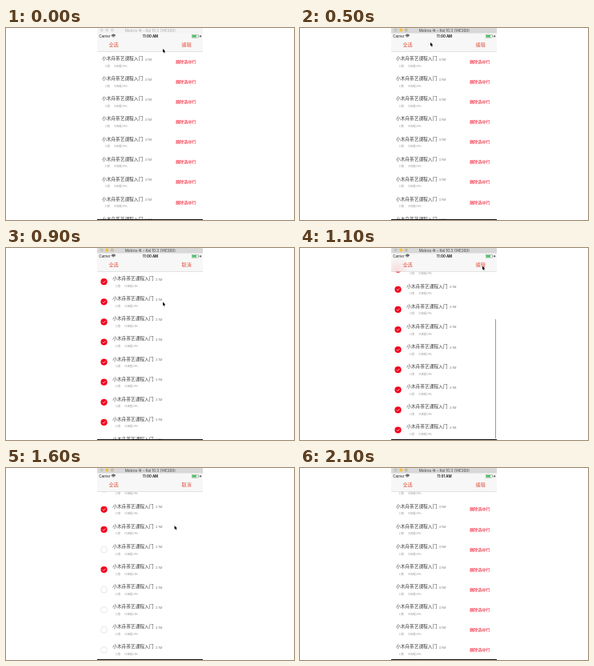
An HTML page with a canvas that plays this animation: 360x240 px, repeating every 2.4 s.

```html
<!DOCTYPE html>
<html lang="zh">
<head>
<meta charset="utf-8">
<style>
  html, body { margin: 0; width: 360px; height: 240px; overflow: hidden; background: #fff; }
  canvas { display: block; }
</style>
</head>
<body>
<canvas id="stage" width="360" height="240"></canvas>
<script>
const ctx = document.getElementById('stage').getContext('2d');
const CJK = '"Noto Sans CJK SC", "Noto Sans CJK", sans-serif';
const LATIN = 'Inter, "Liberation Sans", sans-serif';
const LOOP = 2400, STEP = 100, LAST = 21;
const ROWS = 12, PITCH = 25.1, SCROLL = 90.8;
const RED = '#f0001c', LINK = '#e4503c';

// pointer: [step, x, y], held until the next entry
const pointer = [
  [0, 196, 26], [1, 223, 23], [2, 134.5, 23.5], [4, 223, 22], [5, 163, 18],
  [6, 222, 21], [8, 134, 22], [9, 196, 67.5], [10, 205, 52], [11, 228, 22.5],
  [14, 185, 49], [15, 201, 123], [16, 210.6, 72], [17, 216, 50], [18, 226, 22]
];
// list: [step, editing, selected rows]
const all = [...Array(ROWS).keys()];
const list = [
  [0, false, []], [1, true, []], [3, true, all], [5, false, []],
  [7, true, []], [8, true, all], [12, false, []], [13, true, []],
  [14, true, [4]], [15, true, [4, 7]], [16, true, [4, 5, 7]], [19, false, []]
];
const at = (track, step) => track.filter(k => k[0] <= step).pop();

function rect(x, y, w, h, color) {
  ctx.fillStyle = color;
  ctx.fillRect(x, y, w, h);
}

function disc(x, y, r, color) {
  ctx.beginPath();
  ctx.arc(x, y, r, 0, 7);
  ctx.fillStyle = color;
  ctx.fill();
}

function text(str, x, y, size, color, family = CJK, weight = 400, align = 'left') {
  ctx.font = `${weight} ${size}px ${family}`;
  ctx.textAlign = align;
  ctx.fillStyle = color;
  ctx.fillText(str, x, y);
}

function line(points, color, width) {
  ctx.beginPath();
  points.forEach(p => ctx.lineTo(...p));
  ctx.strokeStyle = color;
  ctx.lineWidth = width;
  ctx.stroke();
}

function checkbox(x, y, on) {
  if (on) {
    disc(x, y, 4.1, RED);
    line([[x - 1.9, y], [x - 0.5, y + 1.4], [x + 2, y - 1.3]], '#fff', 0.7);
  } else {
    ctx.beginPath();
    ctx.arc(x, y, 3.9, 0, 7);
    ctx.strokeStyle = '#ccccd0';
    ctx.lineWidth = 0.5;
    ctx.stroke();
  }
}

function row(y, editing, on) {
  const dx = editing ? 13.2 : 0;
  text('小木舟茶艺课程入门', 120 + dx, y + 2.1, 5.7, '#3c3c3c');
  text('3.1M', 173.5 + dx, y + 2.6, 4.1, '#808080', LATIN);
  text('11集', 123.5 + dx, y + 10.7, 3.2, '#999');
  text('已观看14%', 135 + dx, y + 10.7, 3.3, '#999');
  if (editing) checkbox(122.5, y + 4.2, on);
  else text('删除选中行', 212.2, y + 5.8, 5.1, RED);
}

function header(step, editing, glowing) {
  rect(114, 0, 132, 29.5, '#f7f7f7');
  if (glowing) {
    // a selected row shining through the translucent bar
    const glow = ctx.createRadialGradient(121, 28, 0, 121, 28, 16);
    glow.addColorStop(0, 'rgba(255,180,180,.4)');
    glow.addColorStop(1, 'rgba(255,180,180,0)');
    rect(114, 12, 24, 17.5, glow);
  }
  rect(114, 29.2, 132, 0.5, '#c8c8c8');

  const active = step > 0;
  rect(114, 0, 132, 6.5, active ? '#d8d8d8' : '#f4f4f4');
  const lights = active ? ['#c9c4c0', '#f5c33b', '#c9bba6'] : Array(3).fill('#dcdcdc');
  lights.forEach((c, i) => disc(119.6 + i * 6.6, 2.6, 2.1, c));
  text('Mobira 4t – Kel 10.3 (14E269)', 180.3, 4.5, 4.6, active ? '#444' : '#aaa', LATIN, 400, 'center');

  text('Carrier', 116.3, 11.9, 4.3, '#111', LATIN);
  for (const r of [1.3, 2.6, 3.8]) {
    ctx.beginPath();
    ctx.arc(134.3, 12, r, -2.35, -0.79);
    ctx.strokeStyle = '#111';
    ctx.lineWidth = 0.8;
    ctx.stroke();
  }
  text(step < LAST ? '11:00 AM' : '11:01 AM', 180.5, 11.9, 4.4, '#111', LATIN, 600, 'center');
  ctx.strokeStyle = '#777';
  ctx.lineWidth = 0.4;
  ctx.strokeRect(232.6, 8.5, 7.6, 3.6);
  rect(233, 8.9, 5, 2.8, '#3ccc5a');
  rect(240.7, 9.5, 0.6, 1.6, '#777');
  line([[242, 10.3], [244.4, 10.3]], '#333', 0.7);
  line([[243.2, 9], [243.2, 11.6]], '#333', 0.7);

  text('全选', 128.4, 23.4, 6.1, LINK);
  text(editing && step !== 11 ? '取消' : '编辑', 219.6, 23.4, 6.1, LINK);
}

function arrow(x, y) {
  const shape = [[0, 0], [0, 4.6], [1.1, 3.7], [1.8, 5.4], [2.7, 5], [1.9, 3.4], [3.3, 3.3]];
  ctx.beginPath();
  shape.forEach(([a, b]) => ctx.lineTo(x + a, y + b));
  ctx.closePath();
  ctx.strokeStyle = '#fff';
  ctx.lineWidth = 0.8;
  ctx.stroke();
  ctx.fillStyle = '#000';
  ctx.fill();
}

function draw(now) {
  const step = Math.min(LAST, Math.floor(now % LOOP / STEP));
  const [, editing, picked] = at(list, step);
  const [, px, py] = at(pointer, step);
  const progress = Math.max(0, Math.min(1, (step - 9) / 2));
  const scroll = SCROLL * progress;

  rect(0, 0, 360, 240, '#fff');
  for (let i = 0; i < ROWS; i++) row(38 + i * PITCH - scroll, editing, picked.includes(i));
  if (step === 10 || step === 11) rect(244, 30.5 + 58.5 * progress, 1, 149, '#999');
  header(step, editing, progress === 1 && picked.includes(3));
  rect(114, 239, 132, 1, '#111');
  if (step < LAST) arrow(px, py);
  requestAnimationFrame(draw);
}
requestAnimationFrame(draw);
</script>
</body>
</html>
```
